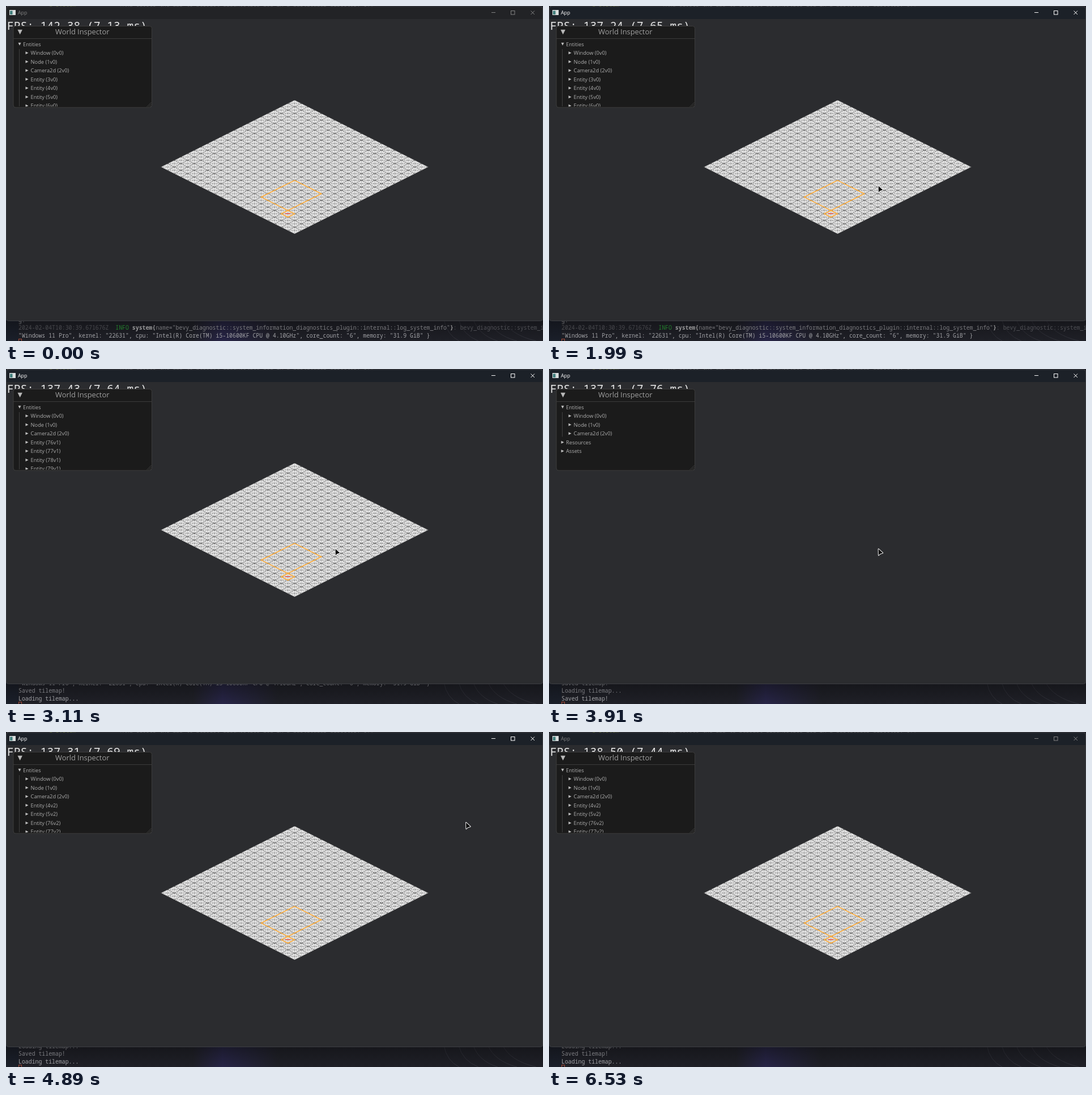
Recreate the animation shown at these times as an HTML page with a canvas. Size 948x591 px, loop 6630 ms.

```html
<!DOCTYPE html>
<html lang="en">
<head>
<meta charset="utf-8">
<title>World Inspector</title>
<style>
html, body { margin: 0; width: 100%; height: 100%; overflow: hidden; background: #1b1c21; }
canvas { display: block; }
</style>
</head>
<body>
<canvas id="stage" width="948" height="591"></canvas>
<script>
const W = 948, H = 591, LOOP = 6630;
const ctx = document.getElementById('stage').getContext('2d');
const SANS = '"Open Sans", "Noto Sans", sans-serif';
const MONO = '"Noto Sans Mono", "DejaVu Sans Mono", monospace';
const CODE = '9.855px ' + MONO;

// [time, frames per second, milliseconds]
const fpsKeys = [[0, 142.38, 7.13], [710, 142.23, 7.12], [1990, 137.24, 7.65], [3110, 137.43, 7.64],
  [4430, 136.90, 7.84], [4890, 137.31, 7.69], [6530, 138.50, 7.44], [LOOP, 138.50, 7.44]];

// [time, x, y] of the pointer tip
const enterPath = [[90, 595, -14], [200, 594, 11], [330, 591, 110], [480, 585, 262], [640, 581, 317]];
const leavePath = [[4520, 581, 317], [4690, 655, 275], [4890, 811, 160], [4990, 864, 78],
  [5120, 902, 30], [5300, 921, 6], [5500, 923, 1], [5930, 923, 1], [6050, 923, -16]];

const SAVED = 'Saved tilemap!', LOADING = 'Loading tilemap...';
const SYSTEM = '"Windows 11 Pro", kernel: "22631", cpu: "Intel(R) Core(TM) i5-10600KF CPU @ 4.10GHz", core_count: "6", memory: "31.9 GiB" }';
const phases = [
  { from: 0, ids: ['3v0', '4v0', '5v0', '6v0'], log: ['g.', null, SYSTEM] },
  { from: 2300, ids: null, log: [null, SYSTEM, SAVED] },
  { from: 2900, ids: ['76v1', '77v1', '78v1', '79v1'], log: [SYSTEM, SAVED, LOADING] },
  { from: 3900, ids: null, log: [SAVED, LOADING, SAVED] },
  { from: 4650, ids: ['4v2', '5v2', '76v2', '77v2'], log: [LOADING, SAVED, LOADING] }
];

const clamp = v => Math.min(1, Math.max(0, v));
const ramp = (t, a, b) => clamp((t - a) / (b - a));
const gray = v => `rgb(${v},${v},${v})`;

function sample(keys, t, stepped) {
  let i = 0;
  while (i < keys.length - 2 && t >= keys[i + 1][0]) i++;
  const a = keys[i], b = keys[i + 1], steps = Math.max(1, Math.round((b[0] - a[0]) / 90));
  let k = ramp(t, a[0], b[0]);
  if (stepped) k = Math.floor(k * steps) / steps;
  return [1, 2].map(n => a[n] + (b[n] - a[n]) * k);
}

function text(s, x, y, color, font) {
  ctx.font = font;
  ctx.fillStyle = color;
  ctx.fillText(s, x, y);
}

function rect(x, y, w, h, color) {
  ctx.fillStyle = color;
  ctx.fillRect(x, y, w, h);
}

function trace(c, points, close = true) {
  c.beginPath();
  points.forEach(p => c.lineTo(...p));
  if (close) c.closePath();
}

function line(c, color, width, points, close = false) {
  trace(c, points, close);
  c.strokeStyle = color;
  c.lineWidth = width;
  c.stroke();
}

function triangle(x, y, r, down, color) {
  trace(ctx, down ? [[x - r, y - r], [x + r, y - r], [x, y + r]] : [[x - r, y - r], [x + r, y], [x - r, y + r]]);
  ctx.fillStyle = color;
  ctx.fill();
}

const iso = (a, b) => [509.5 + 11.8 * (a - b), 166 + 5.9 * (a + b)];
const block = (a, b, c, d) => [iso(a, b), iso(c, b), iso(c, d), iso(a, d)];

function makeMap() {
  const canvas = document.createElement('canvas');
  canvas.width = W;
  canvas.height = H;
  const c = canvas.getContext('2d');
  c.save();
  trace(c, block(0, 0, 20, 20));
  c.clip();
  c.fillStyle = '#e6e6e6';
  c.fillRect(0, 0, W, H);
  for (let i = 0; i <= 40; i++) {
    const full = i % 2 === 0, ink = full ? '#303030' : '#8a8a8a', width = full ? 0.85 : 0.6;
    c.setLineDash(full ? [2.1, 1.2] : [1.2, 2.1]);
    line(c, ink, width, [iso(i / 2, 0), iso(i / 2, 20)]);
    line(c, ink, width, [iso(0, i / 2), iso(20, i / 2)]);
    const y = 166 + 5.9 * i, x = 273.5 + 11.8 * i;
    c.setLineDash([2.6, 1.3]);
    line(c, '#5a5a5a', 0.7, [[273.5, y], [745.5, y]]);
    c.setLineDash([1.4, 1.55]);
    line(c, '#606060', 0.7, [[x, 166], [x, 402]]);
  }
  c.restore();
  line(c, '#ffab35', 1.6, block(12, 12, 16, 17), true);
  line(c, '#ffab35', 1.6, block(16, 17, 17, 18), true);
  line(c, '#e8413a', 1.3, [[492.5, 366.3], [502.5, 366.3]]);
  return canvas;
}
const map = makeMap();

function logHeader(y) {
  const parts = [
    ['2024-02-04T10:30:39.671676Z ', '#68696e', ''], [' INFO ', '#2fb83c', ''], ['system{', '#dedede', 'bold '],
    ['name', '#a8a8ac', ''], ['="bevy_diagnostic::system_information_diagnostics_plugin::internal::log_system_info"', '#b4b4b8', ''],
    ['}', '#dedede', 'bold '], [': bevy_diagnostic::system_information', '#717278', '']
  ];
  let x = 22;
  for (const [s, color, weight] of parts) {
    text(s, x, y, color, weight + CODE);
    x += ctx.measureText(s).width;
  }
}

function terminal(phase) {
  rect(0, 0, W, H, '#1d1e25');
  text('y            ', 0, 1, '#66676c', CODE);
  text('g system', 76, 0.6, '#7c8a35', CODE);
  text('(And closes the app to persist diagnostics log in a particular directory of)', 200, 0.6, '#7a7b80', CODE);
  rect(0, 553, W, 38, '#202128');
  const haze = ctx.createLinearGradient(330, 0, 480, 0);
  haze.addColorStop(0, 'rgba(44,40,86,0)');
  haze.addColorStop(0.35, 'rgba(44,40,86,.75)');
  haze.addColorStop(1, 'rgba(44,40,86,0)');
  rect(330, 553, 150, 38, haze);
  rect(0, 553, 22, 38, 'rgba(24,32,46,.6)');
  for (let i = 0; i < 5; i++) {
    ctx.beginPath();
    ctx.moveTo(773 + i * 26, 553);
    ctx.quadraticCurveTo(778 + i * 28, 580, 800 + i * 34, 591);
    ctx.strokeStyle = '#34353d';
    ctx.lineWidth = 1;
    ctx.stroke();
  }
  phase.log.forEach((s, i) => {
    const y = 557.8 + i * 13.45;
    if (s) text(s, 22, y, i === 2 ? '#bfc0c4' : '#b2b3b8', CODE);
    else if (i === 1) logHeader(y);
  });
  ctx.strokeStyle = '#b5533f';
  ctx.lineWidth = 1;
  ctx.strokeRect(22.5, 587.5, 5, 8);
  const shade = ctx.createLinearGradient(0, 555, 0, 591);
  shade.addColorStop(0, 'rgba(12,12,15,.5)');
  shade.addColorStop(1, 'rgba(12,12,15,.05)');
  rect(0, 555, W, 36, shade);
}

function appWindow(t, phase) {
  ctx.beginPath();
  ctx.roundRect(0.5, 1, 947, 554.5, 4);
  ctx.fillStyle = '#2b2c2f';
  ctx.fill();
  ctx.save();
  ctx.clip();
  const on = ramp(t, 1400, 1560);
  rect(0, 1, W, 22, `rgb(${34 - 6 * on},${35 - 2 * on},${38 + 2 * on})`);
  ctx.restore();
  ctx.strokeStyle = '#3c3e43';
  ctx.lineWidth = 1;
  ctx.stroke();

  const ink = gray(Math.round(130 + 125 * on * (1 - ramp(t, 6100, 6260))));
  rect(6, 7, 11, 9, '#d9dddd');
  rect(7, 8.5, 4.5, 6.5, '#3f7d7b');
  text('App', 21, 15, ink, '8.8px ' + SANS);
  line(ctx, ink, 1, [[857, 11.5], [864, 11.5]]);
  ctx.strokeRect(891.5, 8.5, 6.5, 6.5);
  line(ctx, ink, 1, [[926.5, 8.5], [933, 15]]);
  line(ctx, ink, 1, [[933, 8.5], [926.5, 15]]);

  if (phase.ids) ctx.drawImage(map, 0, 0);
  const [fps, ms] = sample(fpsKeys, t, true);
  text(`FPS: ${fps.toFixed(2)} (${ms.toFixed(2)} ms)`, 2, 42, '#e8e8e8', '500 19.6px ' + MONO);
}

function inspector(phase) {
  const rowFont = '9.25px ' + SANS, ink = '#adadad';
  ctx.beginPath();
  ctx.roundRect(13, 35.5, 244.5, 143.5, 4);
  ctx.fillStyle = '#1b1b1b';
  ctx.fill();
  ctx.strokeStyle = '#3c3c3c';
  ctx.lineWidth = 1;
  ctx.stroke();
  triangle(24.7, 46, 4.2, true, '#b8b8b8');
  text('World Inspector', 87, 49.7, '#a0a0a0', '12.85px ' + SANS);
  line(ctx, '#3c3c3c', 1, [[13, 57.5], [257, 57.5]]);
  for (const d of [2, 5, 8]) line(ctx, '#4a4a4a', 0.8, [[256.5 - d, 178], [256.5, 178 - d]]);

  ctx.save();
  ctx.beginPath();
  ctx.rect(14, 58, 243, 119.5);
  ctx.clip();
  line(ctx, '#3f3f3f', 1, [[23.5, 76], [23.5, phase.ids ? 177 : 119.5]]);
  const row = (label, i, nested = true, open = false) => {
    const y = 67.2 + i * 15.53;
    triangle(nested ? 37 : 24, y, 2.5, open, '#c0c0c0');
    text(label, nested ? 43.6 : 30, y + 3.3, ink, rowFont);
  };
  row('Entities', 0, false, true);
  ['Window (0v0)', 'Node (1v0)', 'Camera2d (2v0)'].forEach((s, i) => row(s, i + 1));
  if (phase.ids) phase.ids.forEach((id, i) => row(`Entity (${id})`, i + 4));
  else ['Resources', 'Assets'].forEach((s, i) => row(s, i + 4, false));
  ctx.restore();
}

function arrow(x, y) {
  const points = [[x + 0.6, y + 0.6], [x + 0.9, y + 11.6], [x + 3.6, y + 9], [x + 8.2, y + 7.6]];
  ctx.lineJoin = 'round';
  line(ctx, '#f0f0f0', 2, points, true);
  ctx.fillStyle = '#050505';
  ctx.fill();
  ctx.lineJoin = 'miter';
}

function pointer(t) {
  if (t > 200 && t < 1400) {
    trace(ctx, [[593, 12], [597, 12], [603, 18], [602, 22], [592, 22]]);
    ctx.fillStyle = '#17181a';
    ctx.fill();
  }
  if (t >= 90 && t < 6050) arrow(...sample(t < 4520 ? enterPath : leavePath, t));
}

function draw(now) {
  const t = now % LOOP;
  const phase = phases.filter(p => p.from <= t).pop();
  terminal(phase);
  appWindow(t, phase);
  inspector(phase);
  pointer(t);
}

const start = performance.now();
function tick() {
  draw(performance.now() - start);
  requestAnimationFrame(tick);
}
tick();
</script>
</body>
</html>
```
